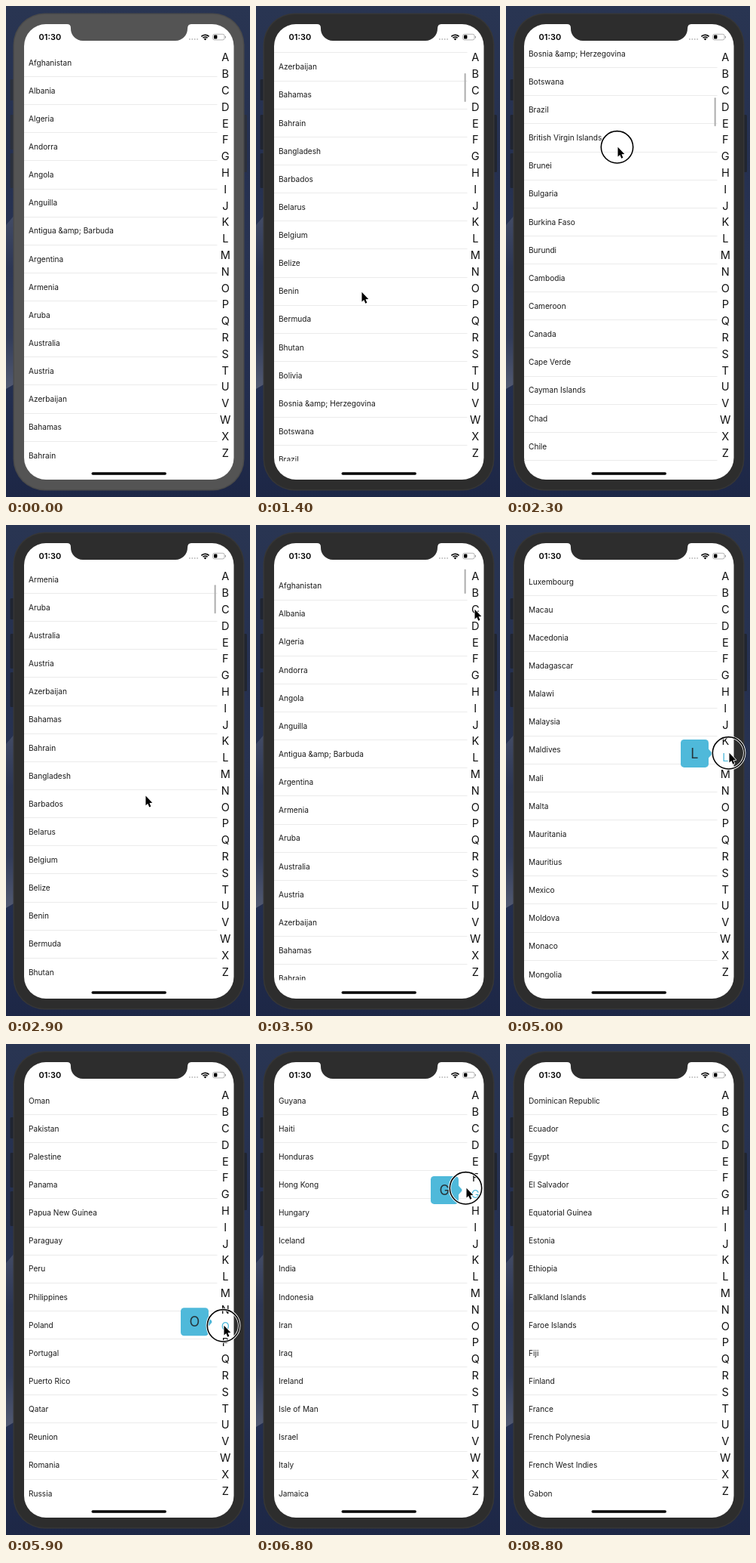
Recreate the animation shown at these times as an HTML page with a canvas. Size 324 by 650 pixels, loop 8.9 s.

```html
<!DOCTYPE html>
<html lang="en">
<head>
<meta charset="utf-8">
<title>Country index list</title>
<style>
html, body { margin: 0; width: 100%; height: 100%; overflow: hidden; background: #25304f; }
canvas { display: block; width: 324px; height: 650px; }
</style>
</head>
<body>
<canvas id="stage"></canvas>
<script>
const W = 324, H = 650, LOOP = 8900, STEP = 100;
const canvas = document.getElementById('stage');
const ctx = canvas.getContext('2d');
const dpr = window.devicePixelRatio || 1;
canvas.width = W * dpr;
canvas.height = H * dpr;

const FONT = 'Inter, Roboto, sans-serif';
const BLUE = '#4fb9da';
const LETTERS = 'ABCDEFGHIJKLMNOPQRSTUVWXZ';
const LETTER_TOP = 68, LETTER_GAP = 21.8, LETTER_X = 291.3;
const LIST = { x: 24, y: 56.4, w: 256.5, h: 546, row: 37.13, rows: 211 };

const countries = `Afghanistan,Albania,Algeria,Andorra,Angola,Anguilla,Antigua &amp; Barbuda,
Argentina,Armenia,Aruba,Australia,Austria,Azerbaijan,Bahamas,Bahrain,Bangladesh,Barbados,Belarus,
Belgium,Belize,Benin,Bermuda,Bhutan,Bolivia,Bosnia &amp; Herzegovina,Botswana,Brazil,
British Virgin Islands,Brunei,Bulgaria,Burkina Faso,Burundi,Cambodia,Cameroon,Canada,Cape Verde,
Cayman Islands,Chad,Chile,China,Colombia,Congo,Cook Islands,Costa Rica,Cote D Ivoire,Croatia,
Cruise Ship,Cuba,Cyprus,Czech Republic,Denmark,Djibouti,Dominica,Dominican Republic,Ecuador,Egypt,
El Salvador,Equatorial Guinea,Estonia,Ethiopia,Falkland Islands,Faroe Islands,Fiji,Finland,France,
French Polynesia,French West Indies,Gabon,Gambia,Georgia,Germany,Ghana,Gibraltar,Greece,Greenland,
Grenada,Guam,Guatemala,Guernsey,Guinea,Guinea Bissau,Guyana,Haiti,Honduras,Hong Kong,Hungary,Iceland,
India,Indonesia,Iran,Iraq,Ireland,Isle of Man,Israel,Italy,Jamaica,Japan,Jersey,Jordan,Kazakhstan,
Kenya,Kuwait,Kyrgyz Republic,Laos,Latvia,Lebanon,Lesotho,Liberia,Libya,Liechtenstein,Lithuania,
Luxembourg,Macau,Macedonia,Madagascar,Malawi,Malaysia,Maldives,Mali,Malta,Mauritania,Mauritius,Mexico,
Moldova,Monaco,Mongolia,Montenegro,Montserrat,Morocco,Mozambique,Namibia,Nepal,Netherlands,
Netherlands Antilles,New Caledonia,New Zealand,Nicaragua,Niger,Nigeria,Norway,Oman,Pakistan,Palestine,
Panama,Papua New Guinea,Paraguay,Peru,Philippines,Poland,Portugal,Puerto Rico,Qatar,Reunion,Romania,
Russia,Rwanda`.split(',').map(s => s.trim());

// Keys: [ms, scroll offset] for the finger-driven part.
const scrollKeys = [[700, 0], [1000, 170], [1200, 320], [1400, 440], [1700, 590],
  [2300, 903], [2400, 903], [2700, 649], [2900, 300], [3150, 0], [3300, -32], [3500, -5.5], [3600, 0]];
// Keys: [ms, x, y] of the pointer tip.
const pointerKeys = [[100, 334, 520], [600, 139, 470], [700, 139, 470], [1000, 140, 300],
  [1400, 140, 378], [1700, 145, 500], [2300, 148, 186], [2400, 148, 186], [2700, 150, 440],
  [3500, 290, 111], [3700, 291, 112], [4300, 294, 200], [5000, 296, 301], [5700, 290, 372],
  [5900, 289, 372], [6800, 279, 190], [7600, 284, 135], [8000, 286, 135], [8500, 336, 190]];
const presses = [[700, 1000], [1700, 2700], [3600, 8000]];
const INDEX_START = 3600, INDEX_END = 8000, FOCUS = 700;

function sample(keys, t, col) {
  if (t <= keys[0][0]) return keys[0][col];
  for (let i = 1; i < keys.length; i++) {
    const a = keys[i - 1], b = keys[i];
    if (t <= b[0]) return a[col] + (b[col] - a[col]) * (t - a[0]) / (b[0] - a[0]);
  }
  return keys[keys.length - 1][col];
}

const letterY = i => LETTER_TOP + i * LETTER_GAP;

function letterAt(t) {
  const y = sample(pointerKeys, Math.min(t, INDEX_END), 2);
  return Math.max(0, Math.min(24, Math.round((y - LETTER_TOP) / LETTER_GAP)));
}

// Choosing a letter puts its last entry at the top of the list.
function scrollAt(t) {
  if (t < INDEX_START) return sample(scrollKeys, t, 1);
  const letter = LETTERS[letterAt(t)];
  return countries.findLastIndex(c => c[0] === letter) * LIST.row;
}

function box(x, y, w, h, r, color) {
  ctx.fillStyle = color;
  ctx.beginPath();
  ctx.roundRect(x, y, w, h, r);
  ctx.fill();
}

function poly(points, color) {
  ctx.fillStyle = color;
  ctx.beginPath();
  points.forEach(([x, y]) => ctx.lineTo(x, y));
  ctx.closePath();
  ctx.fill();
}

function text(str, x, y, size, color = '#111', align = 'left', weight = 400) {
  ctx.font = `${weight} ${size}px ${FONT}`;
  ctx.textAlign = align;
  ctx.fillStyle = color;
  ctx.fillText(str, x, y);
}

function gradient(top, bottom, stops) {
  const g = ctx.createLinearGradient(0, top, 0, bottom);
  stops.forEach(([at, color]) => g.addColorStop(at, color));
  return g;
}

function drawDesktop() {
  ctx.fillStyle = gradient(0, H, [[0, '#293552'], [0.3, '#253050'], [0.5, '#283352'],
    [0.78, '#232e4f'], [1, '#1d2746']]);
  ctx.fillRect(0, 0, W, H);
  const haze = gradient(278, 508, [[0, '#424b65'], [0.3, '#2c3654'], [0.7, '#323c59'], [1, '#525a72']]);
  poly([[0, 290], [12, 276], [12, 500], [0, 507]], haze);
}

function drawPhone(active) {
  const rim = active ? '#363636' : '#4a4a4a';
  const body = active ? '#2d2d2d' : '#545454';
  const key = active ? '#202531' : '#2b303c';
  [[97, 28], [144, 46], [195, 46]].forEach(([y, h]) => box(5.5, y, 6, h, 1.5, key));
  box(314, 144, 6, 76, 1.5, key);
  box(9.5, 9.5, 307, 632, 42, rim);
  box(11, 11, 304, 629, 40.5, body);
  box(24, 24, 278.5, 603, 29, '#fff');

  // Notch with small fillets at the top edge.
  ctx.fillStyle = body;
  ctx.beginPath();
  ctx.moveTo(81, 23);
  ctx.lineTo(81, 24);
  ctx.quadraticCurveTo(86, 24, 86, 29);
  ctx.arcTo(86, 46, 103, 46, 16);
  ctx.lineTo(226, 46);
  ctx.arcTo(241, 46, 241, 29, 16);
  ctx.quadraticCurveTo(241, 24, 246, 24);
  ctx.lineTo(246, 23);
  ctx.fill();
}

function drawStatus() {
  text('01:30', 43.5, 45, 11, '#000', 'left', 600);
  for (let i = 0; i < 4; i++) box(243 + i * 3.4, 43, 1.8, 1.8, 0.9, '#b5b5b5');
  ctx.strokeStyle = '#000';
  ctx.lineWidth = 1.6;
  [7, 4.2].forEach(r => {
    ctx.beginPath();
    ctx.arc(264.5, 45.2, r, -Math.PI * 0.76, -Math.PI * 0.24);
    ctx.stroke();
  });
  poly([[264.5, 45.4], [262.7, 43.4], [264.5, 42.6], [266.3, 43.4]], '#000');
  ctx.strokeStyle = '#a0a0a0';
  ctx.lineWidth = 0.8;
  ctx.beginPath();
  ctx.roundRect(274.6, 37.3, 15.4, 7.6, 2.2);
  ctx.stroke();
  box(276, 38.6, 4.4, 5, 1, '#000');
  box(290.9, 39.8, 1.1, 2.8, 0.6, '#a0a0a0');
  box(113.5, 617.3, 99.5, 3.5, 1.75, '#000');
}

function drawList(offset) {
  const { x, y, w, h, row } = LIST;
  ctx.save();
  ctx.beginPath();
  ctx.rect(x, y, w + 1, h);
  ctx.clip();
  const first = Math.max(0, Math.floor(offset / row));
  for (let i = first; i < first + 17 && i < countries.length; i++) {
    const top = y + i * row - offset;
    text(countries[i], 30, top + 22.3, 10.15, '#1a1a1a');
    ctx.fillStyle = '#e9e9e9';
    ctx.fillRect(x, Math.round(top + row - 0.5), w, 0.9);
  }
  ctx.restore();
}

function drawScrollbar(t, offset) {
  const alpha = Math.min(1, Math.max(0, (t - 700) / 100)) * Math.min(1, Math.max(0, (3800 - t) / 200));
  if (!alpha) return;
  const content = LIST.row * LIST.rows;
  const pos = t < INDEX_START ? offset : 0;
  const length = Math.max(6, 38 + Math.min(0, pos));
  ctx.globalAlpha = alpha;
  box(276.6, LIST.y + 2 + Math.max(0, pos) / content * LIST.h, 2.1, length, 1, '#b0b0b0');
  ctx.globalAlpha = 1;
}

function drawIndex(selected) {
  [...LETTERS].forEach((c, i) =>
    text(c, LETTER_X, letterY(i) + 5.3, 14.6, i === selected ? BLUE : '#111', 'center'));
  if (selected < 0) return;
  const y = letterY(selected) - 5.4;
  box(232, y - 18.5, 37, 37, 4.5, BLUE);
  poly([[268.5, y - 6.5], [273.3, y - 1], [273.3, y + 1], [268.5, y + 6.5]], BLUE);
  text(LETTERS[selected], 250.3, y + 6.4, 18, '#26343a', 'center');
}

function drawPointer(t, pressed) {
  if (t < 100 || t >= 8500) return;
  const x = sample(pointerKeys, t, 1), y = sample(pointerKeys, t, 2);
  if (pressed) {
    [['#fff', 3.4], ['#000', 1.6]].forEach(([color, width]) => {
      ctx.strokeStyle = color;
      ctx.lineWidth = width;
      ctx.beginPath();
      ctx.arc(x - 0.5, y + 0.8, 21.2, 0, Math.PI * 2);
      ctx.stroke();
    });
  }
  ctx.beginPath();
  [[0, 0], [0, 12.8], [2.8, 10.2], [4.8, 14.9], [6.9, 14], [5, 9.4], [8.8, 9.2]]
    .forEach(([dx, dy]) => ctx.lineTo(x + 0.5 + dx, y + 0.8 + dy));
  ctx.closePath();
  ctx.strokeStyle = '#fff';
  ctx.lineWidth = 1.6;
  ctx.lineJoin = 'round';
  ctx.stroke();
  ctx.fillStyle = '#000';
  ctx.fill();
}

function draw(now) {
  const t = Math.floor((now % LOOP) / STEP) * STEP;
  const pressed = presses.some(([from, to]) => t >= from && t < to);
  const picking = t >= INDEX_START && t < INDEX_END;
  const offset = scrollAt(t);
  ctx.setTransform(dpr, 0, 0, dpr, 0, 0);
  drawDesktop();
  drawPhone(t >= FOCUS);
  drawList(offset);
  drawScrollbar(t, offset);
  drawStatus();
  drawIndex(picking ? letterAt(t) : -1);
  drawPointer(t, pressed);
}

const start = performance.now();
function frame() {
  draw(performance.now() - start);
  requestAnimationFrame(frame);
}
frame();
</script>
</body>
</html>
```
